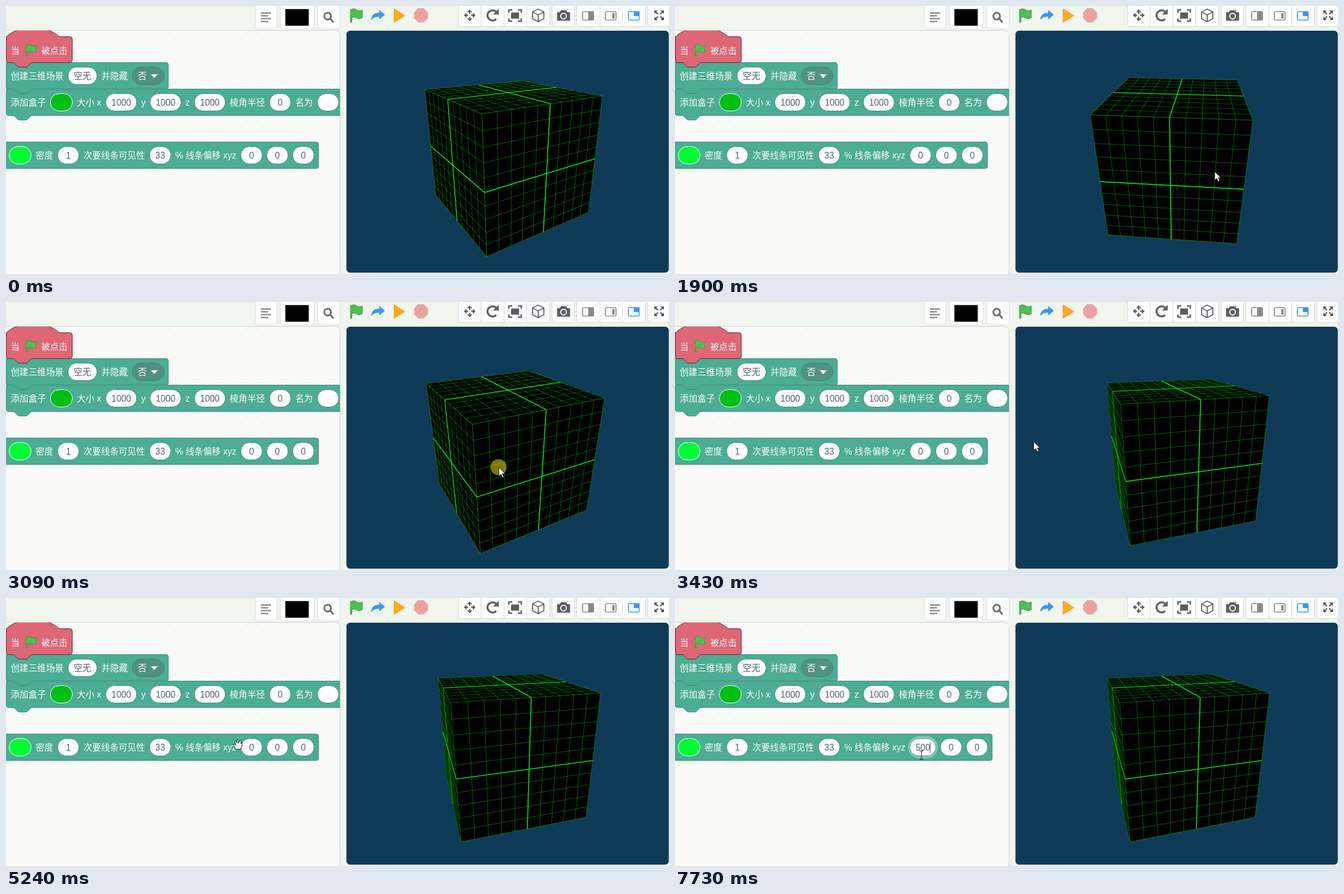
Write an HTML page with a canvas that moves like this. It is 1176 by 476 pixels and loops after 8 s.

```html
<!DOCTYPE html>
<html lang="zh">
<head>
<meta charset="utf-8">
<style>
html, body { margin: 0; width: 100%; height: 100%; overflow: hidden; background: #f0f5ee; }
canvas { display: block; }
</style>
</head>
<body>
<canvas id="view" width="1176" height="476"></canvas>
<script>
const g = document.getElementById('view').getContext('2d');
const LOOP = 8000, TICK = 69.3, TICK0 = 600;
const FONT = '15.6px "Liberation Sans", "Noto Sans CJK SC", "Noto Sans CJK", sans-serif';
const TEAL = '#4cac94', TEAL_EDGE = '#3b8b77', ICON = '#5b5f66', INK = '#575e75';

// ---------- motion ----------
function ease(t, from, to) {
  const k = Math.min(1, Math.max(0, (t - from) / (to - from)));
  return k * k * (3 - 2 * k);
}

// key points of the pointer: time, x, y
const PATH = [
  [70, 852, 391], [270, 313, 246], [590, 313, 246], [780, 198, 270], [1100, 430, 310],
  [1420, 765, 296], [1900, 957, 293], [2600, 943, 319], [3090, 877, 294], [3850, 355, 194],
  [4200, 158, 215], [4760, 341, 176], [5240, 411, 260], [5500, 437, 279]
];
const isPressed = t => (t > 1500 && t < 1850) || (t > 1980 && t < 3250) || (t > 5490 && t < 5575);

function pointerAt(t) {
  const i = PATH.findIndex(p => p[0] > t);
  if (i < 1) return PATH.at(i).slice(1);
  const [t0, x0, y0] = PATH[i - 1], [t1, x1, y1] = PATH[i];
  const k = (t - t0) / (t1 - t0);
  return [x0 + (x1 - x0) * k, y0 + (y1 - y0) * k];
}

// two drags turn the box, then it settles
function orbitAt(t) {
  const out = ease(t, 1480, 1910), settle = ease(t, 3920, 4150);
  return {
    yaw: 33 + 51.7 * out - 67.5 * ease(t, 2205, 3410) - 0.4 * settle,
    elev: 21.3 + 6.3 * out - 7.6 * ease(t, 3050, 3420) + 1.2 * settle
  };
}

// ---------- drawing helpers ----------
function paint(path, fill, stroke, lw = 1) {
  if (fill) { g.fillStyle = fill; g.fill(path); }
  if (stroke) { g.strokeStyle = stroke; g.lineWidth = lw; g.stroke(path); }
}
function svg(d, fill, stroke, lw) { paint(new Path2D(d), fill, stroke, lw); }
function rr(x, y, w, h, r, fill, stroke, lw) {
  const p = new Path2D();
  p.roundRect(x, y, w, h, r);
  paint(p, fill, stroke, lw);
  return p;
}
function at(x, y, s, draw) {
  g.save();
  g.translate(x, y);
  g.scale(s, s);
  draw();
  g.restore();
}
function spin4(x, y, draw) {
  at(x, y, 1, () => {
    for (let i = 0; i < 4; i++) { draw(); g.rotate(Math.PI / 2); }
  });
}
function text(s, x, y, color = '#fff') {
  g.fillStyle = color;
  g.fillText(s, x, y + 5.7);
}
function textWidth(s) { return g.measureText(s).width; }
function flag(x, y, s) {
  at(x, y, s, () => svg('M3 3C8 0 11 2 14 4 17 5.5 20 5 22.5 3.5V16C18 19 15 17.5 12 16 9 14.5 7 15 5 16V24H3Z',
    '#4cbf56', '#45993d', 1.2));
}

// ---------- toolbars ----------
function buttons(edge, ...spans) {
  for (const [x, w] of spans) rr(x + 0.5, -6, w, 46.5 - (x > 600 ? 4 : 0), 5, '#fff', edge);
}

function leftBar() {
  buttons('#dcdfdc', [442, 38], [486, 60], [552, 40]);
  svg('M452 12.5H470M452 17.5H465M452 22.5H470M452 27.5H465', null, '#6d7278', 2);
  rr(495.5, 5.5, 41.5, 29.5, 0, '#000', '#777');
  svg('M576.5 18a6 6 0 1 1-12 0a6 6 0 1 1 12 0M575 22.5L581 29', null, '#656a70', 3);
}

function rightBar() {
  flag(608, 3.5, 1.06);
  svg('M647.5 25Q649 12 662 12V7L672 15.5L662 24V19Q653 18 647.5 25Z', '#3796f3');
  svg('M688.5 5.5V28.5L707 17Z', '#ffab19', '#f7a21b', 1.5);
  svg('M731 4.5H741L748 11.5V21.5L741 28.5H731L724.5 21.5V11.5Z', '#eca29f', '#e59a97', 1);

  const edge = '#d3d7d3';
  buttons(edge, [802, 162], [968, 40], [1012, 122], [1138, 50]);
  svg('M842.5 0V36M883.5 0V36M923.5 0V36M1053.5 0V36M1093.5 0V36', null, edge, 1);

  spin4(822.5, 16.5, () => svg('M0 -10.5L4.5 -5.5H-4.5ZM-1.3 -6H1.3V-2.8H-1.3Z', ICON));
  svg('M869.5 23A9 9 0 1 1 870 11', null, ICON, 3.4);
  svg('M874 5V15H864Z', ICON);
  svg('M892 12V7H898M908 7H914V12M914 22V27H908M898 27H892V22', null, ICON, 2.6);
  rr(896, 11.5, 14, 11, 0, ICON);
  svg('M944 5.5L954 10.5V22.5L944 28L934 22.5V10.5ZM934 10.5L944 16L954 10.5M944 16V28', null, ICON, 1.8);
  svg('M977.5 11H982L984.5 7.5H993.5L996 11H1000.5V26H977.5Z', ICON);
  svg('M994 18a5 5 0 1 1-10 0a5 5 0 1 1 10 0', null, '#fff', 2);

  const pane = (x, color, part) => {
    rr(x - 9.5, 10, 19, 15, 2, '#fff', color, 1.6);
    at(x, 10, 1, () => svg(part, color));
  };
  pane(1032.5, '#85898c', 'M0 0H10V15H0Z');
  pane(1072.5, '#85898c', 'M3 2.5H7V12.5H3Z');
  pane(1113.5, '#3797f5', 'M0 0H10V8H0Z');
  spin4(1158.5, 16.5, () => {
    svg('M8.5 -8.5V-2.5L2.5 -8.5Z', '#4d5260');
    svg('M2 -2L6.5 -6.5', null, '#4d5260', 2.2);
  });
}

// ---------- block workspace ----------
const GAP = 7.9;
const NOTCH = 'c-2 0-3 1-4 2l-4 4c-1 1-2 2-4 2h-11c-2 0-3-1-4-2l-4-4c-1-1-2-2-4-2';

function pill(x, w, y, fill, edge = TEAL_EDGE) { rr(x, y - 15.5, w, 31, 15.5, fill, edge); }

// kinds of block part: each has a width and a way to draw itself
const label = s => ({ w: textWidth(s), draw: (x, y) => text(s, x, y) });
const swatch = color => ({ w: 39, draw: (x, y) => pill(x, 39, y, color, '#fff') });
const field = s => {
  const tw = textWidth(s), w = Math.max(38, tw + 20.3);
  return {
    w,
    draw(x, y) {
      pill(x, w, y, '#fff');
      text(s, x + (w - tw) / 2, y, INK);
    }
  };
};
const menu = s => ({
  w: 56,
  draw(x, y) {
    pill(x, 56, y, '#50917f', '#3f8371');
    text(s, x + 10, y);
    at(x + 39, y, 1, () => svg('M-5.3 -2.2H5.3L0 3.6Z', '#fff', '#fff'));
  }
});
const editor = t => {
  const value = t < 6330 ? '0' : t < 6530 ? '5' : t >= 6730 && t < 7590 ? '5000' : '500';
  const base = field(value), w = base.w, tw = textWidth(value);
  if (t < 5580) return base;
  const ring = ease(t, 5540, 5840);
  return {
    w,
    draw(x, y) {
      rr(x + 2 - 3 * ring, y - 15 - 2.5 * ring, w - 4 + 6 * ring, 30 + 5 * ring, 18,
        null, 'rgba(255,255,255,.35)', 4);
      base.draw(x, y);
      const left = x + (w - tw) / 2;
      if (t < 6330) {
        g.fillStyle = '#2d7fe0';
        g.fillRect(left, y - 9, tw, 18);
        text(value, left, y);
      } else if (t < 7260 || t >= 7730) {
        g.fillStyle = INK;
        g.fillRect(Math.floor(left + tw), y - 9, 1, 18);
      }
    }
  };
};

// lays the parts out from x, with the block drawn behind them
function row(x, y, shape, parts) {
  const end = parts.reduce((e, p) => e + p.w + GAP, x);
  shape(end, y);
  for (const p of parts) {
    p.draw(x, y);
    x += p.w + GAP;
  }
}
function stackShape(end, y) {
  const top = y - 23.5, b = y + 23.5;
  svg(`M.5 ${top}H${end - 4}q4 0 4 4V${b - 4}q0 4-4 4H47${NOTCH}H4q-3.5 0-3.5-4Z`, TEAL, TEAL_EDGE);
}
function plainShape(end, y) { rr(-20, y - 23.5, end + 20, 47, 4, TEAL, TEAL_EDGE); }

function workspace(t) {
  g.save();
  g.clip(rr(-9.5, 43.5, 602, 450, [0, 8, 0, 0], '#fafaf9', '#cdd2cd'));
  g.fillStyle = '#e2e2e2';
  for (let y = 58.5; y < 476; y += 38.8)
    for (let x = 28; x < 592; x += 38.8) g.fillRect(x, y, 1.6, 1.6);

  const size = field('1000');
  row(8.5, 171, stackShape, [label('添加盒子'), swatch('#00bf16'), label('大小 x'), size,
    label('y'), size, label('z'), size, label('棱角半径'), field('0'), label('名为'), field(''), field('')]);
  row(8.5, 124, stackShape, [label('创建三维场景'), field('空无'), label('并隐藏'), menu('否')]);

  svg(`M.5 54.5c24-22 70-22 94 0H113.5q4 0 4 4V96.5q0 4-4 4H47${NOTCH}H4q-3.5 0-3.5-4Z`, '#df6675', '#55272d');
  text('当', 8.5, 79);
  flag(33, 67, 0.88);
  text('被点击', 62.5, 79);

  row(5.5, 265, plainShape, [swatch('#00fc34'), label('密度'), field('1'), label('次要线条可见性'),
    field('33'), label('% 线条偏移 xyz'), editor(t), field('0'), field('0')]);
  g.restore();
}

// ---------- stage with the box ----------
const FOCAL = 508.5, DIST = 4.85, CX = 890.7, CY = 259.5;

function cube({ yaw, elev }) {
  const rad = Math.PI / 180, S = Math.sin(elev * rad), C = Math.cos(elev * rad);
  const project = (ang, x, y, z) => {
    const s = Math.sin(ang), c = Math.cos(ang);
    const h = x * c + z * s, d = z * c - x * s;
    const k = FOCAL / (DIST - y * S - d * C);
    return [CX + h * k, CY - (y * C - d * S) * k];
  };

  // lines that crowd together on a slanted face grow fainter
  const lines = (map, spread) => {
    const [ax, ay] = map(-1, 0), [bx, by] = map(1, 0);
    const [cx, cy] = map(0, -1), [dx, dy] = map(0, 1);
    const area = Math.abs((bx - ax) * (dy - cy) - (by - ay) * (dx - cx));
    const cell = area / Math.hypot(dx - cx, dy - cy) / 10;
    const fade = 1 / (1 + 1.41 / cell) - 0.1;
    for (let i = -5; i <= 5; i++) {
      g.beginPath();
      g.moveTo(...map(i / 5, -1));
      g.lineTo(...map(i / 5, 1));
      g.strokeStyle = `rgba(0,245,14,${i ? fade * 0.33 : fade})`;
      g.lineWidth = i ? 1.5 : 1.9;
      g.stroke();
    }
  };
  const face = map => {
    g.beginPath();
    for (const [u, v] of [[-1, -1], [1, -1], [1, 1], [-1, 1]]) g.lineTo(...map(u, v));
    g.fillStyle = '#000';
    g.fill();
    lines(map);
    lines((u, v) => map(v, u));
  };

  for (let side = 0; side < 4; side++) {
    const ang = (yaw + 90 * side) * rad;
    if (Math.cos(ang) * C * DIST > 1) face((u, v) => project(ang, u, v, 1));
  }
  face((u, v) => project(yaw * rad, u, 1, v));
}

function stage(t) {
  rr(603.5, 43.5, 572.5, 430.5, 7, '#0e3a58', '#d5dbd8');
  cube(orbitAt(t));
}

// ---------- pointer ----------
const ARROW = 'M.5 .5V16L4.2 12.6L6.8 18.2L9.4 17L6.9 11.5H11.6Z';
const BEAM = 'M-3.5 -7.5H-1L0 -6.5L1 -7.5H3.5M0 -6.5V7M-3.5 8H-1L0 7L1 8H3.5';
const HAND = 'M-4 8.5L-7.5 1.5Q-8 -.8 -6 -.5L-4 1.5L-5 -5.5Q-4 -7.5 -2.5 -5.5L-1.5 -2V-7.5Q0 -9.5 1.5 -7.5V-2L3 -6.5Q4.5 -8 5.5 -6V-1L6.5 -3.5Q8 -4 8 -2L6.5 4.5L5 8.5Z';

const overBlock = (x, y) =>
  (y > 241 && y < 289 && x < 556) || (y > 148 && y < 193 && x < 592);

function pointer(t) {
  const [x, y] = pointerAt(t);
  if (isPressed(t)) rr(x - 14.2, y - 14.2, 28.4, 28.4, 14.2, 'rgba(255,238,0,.5)');
  at(x, y, 1, () => {
    if (t > 5450) svg(BEAM, null, '#333', 1.2);
    else svg(overBlock(x, y) ? HAND : ARROW, '#fff', '#1a1a1a', 1);
  });
}

function draw() {
  const now = performance.now() % LOOP;
  const t = TICK0 + TICK * Math.floor((now - TICK0) / TICK + 0.35);
  g.font = FONT;
  g.fillStyle = '#f0f5ee';
  g.fillRect(0, 0, 1176, 476);
  leftBar();
  rightBar();
  workspace(now);
  stage(t);
  if (now >= 70) pointer(t);
  requestAnimationFrame(draw);
}
draw();
</script>
</body>
</html>
```
